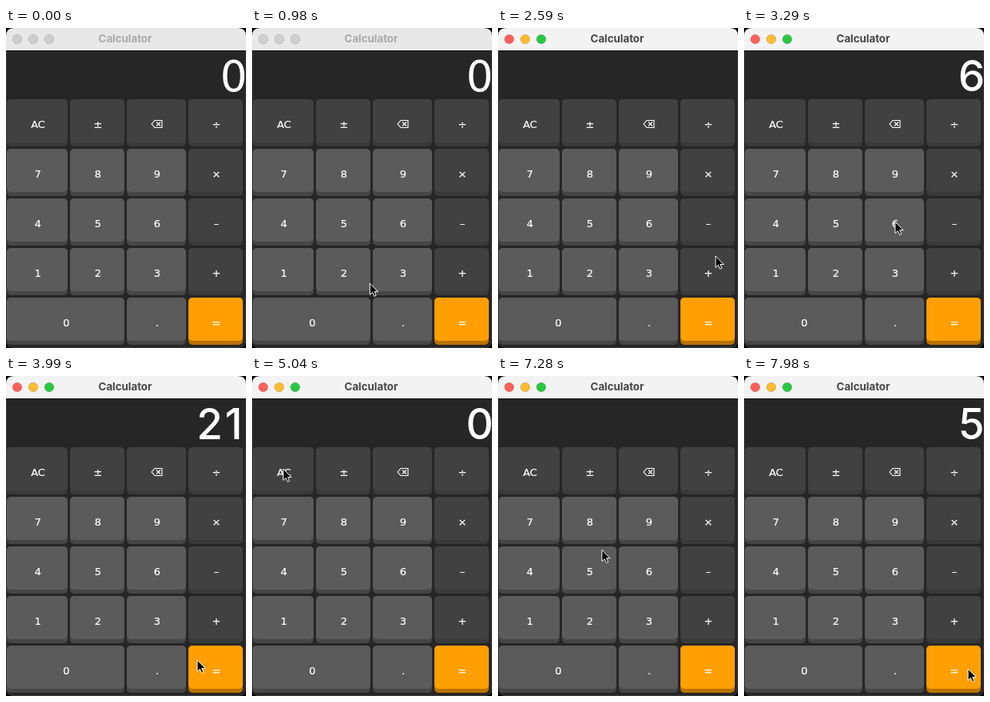
Animation, 300 px wide and 400 px high, one loop 8000 ms. Source, as an HTML page:

```html
<!DOCTYPE html>
<html lang="en">
<head>
<meta charset="utf-8">
<title>Calculator</title>
<style>
  html, body { margin: 0; width: 100%; height: 100%; overflow: hidden; background: #000; }
  svg { display: block; width: 100%; height: 100%; }
  text { text-anchor: middle; fill: #fff; }
  .title { font: 700 13.3px Inter, sans-serif; }
  .key { font: 13px "DejaVu Sans", sans-serif; stroke: #fff; stroke-width: .2; }
  .digit { font: 500 53px Inter, sans-serif; }
  .digit.initial { font: 53px "DejaVu Sans", sans-serif; }
</style>
</head>
<body>
<svg viewBox="0 0 300 400">
  <rect width="300" height="400" fill="#000"/>
  <rect y="10" width="300" height="390" rx="9" fill="#262627"/>
  <path id="titleBar" d="M0 28V10Q0 0 10 0H290Q300 0 300 10V28Z"/>
  <rect y="28" width="300" height="1" fill="#111"/>
  <path d="M.5 29V391Q.5 399.5 9 399.5H291Q299.5 399.5 299.5 391V29" fill="none" stroke="#3a3a3b"/>
  <g id="lights"></g>
  <text id="title" class="title" x="149" y="18.3">Calculator</text>
  <g id="display"></g>
  <g id="keys"></g>
  <path id="cursor" d="M0 0V14.4L3.3 11.4L5.5 16.3L7.8 15.3L5.7 10.5H10.2Z"
        fill="#000" stroke="#fff" stroke-linejoin="round"/>
</svg>
<script>
const LOOP = 8000, STEP = 70, ACTIVATE = 1190;
const byId = id => document.getElementById(id);

function add(parent, tag, attributes, text = '') {
  const node = document.createElementNS('http://www.w3.org/2000/svg', tag);
  for (const name in attributes) node.setAttribute(name, attributes[name]);
  node.textContent = text;
  parent.append(node);
  return node;
}

// Keys: a lit face over a darker lower edge
const palette = {
  dark: ['#414141', '#3a3a3a'],
  light: ['#5b5b5b', '#464646'],
  orange: ['#ff9f02', '#b87303']
};
const columns = [[1, 76], [80, 68], [151, 74], [228, 68]];
const rows = ['C±⌫÷', '789×', '456–', '123+', '0 .='];
const keyCenters = {};

function addKey(label, x, y, width, kind) {
  const keys = byId('keys'), [face, edge] = palette[kind];
  const center = x + width / 2 + 1;
  keyCenters[label] = [center - 1, y + 27];
  add(keys, 'rect', { x, y, width, height: 59, rx: 5, fill: edge });
  add(keys, 'rect', { x, y, width, height: 54, rx: 5, fill: face });
  if (label === '⌫') {
    add(keys, 'path', {
      d: `M${center - 7} ${y + 31}l4 -4.5h9v9h-9ZM${center - 1} ${y + 28.5}l5 5m0 -5l-5 5`,
      fill: 'none', stroke: '#fff', 'stroke-width': 1.1
    });
  } else {
    add(keys, 'text', { class: 'key', x: center, y: y + 36 }, label === 'C' ? 'AC' : label);
  }
}

rows.forEach((labels, row) => [...labels].forEach((label, column) => {
  if (label === ' ') return;
  const [x, width] = columns[column];
  const kind = label === '=' ? 'orange' : row === 0 || column === 3 ? 'dark' : 'light';
  addKey(label, x, 89 + row * 62, label === '0' ? 147 : width, kind);
}));

const lights = ['#ff5f57', '#febc2e', '#28c840'].map((color, i) => ({
  color,
  node: add(byId('lights'), 'circle', { cx: 14 + i * 20, cy: 14, r: 5.8, 'stroke-width': 0.8 })
}));

// Key presses; aim is where the pointer lands relative to the key's center
const presses = [
  { key: '1', at: 1330 },
  { key: '5', at: 1750 },
  { key: '+', at: 2520, aim: [10, -17] },
  { key: '6', at: 3150 },
  { key: '=', at: 3920, aim: [-23, -9] },
  { key: 'C', at: 5040 },
  { key: '2', at: 5530 },
  { key: '0', at: 5880, aim: [-18, 9] },
  { key: '÷', at: 6860, aim: [6, 19] },
  { key: '4', at: 7550, aim: [26, 16] },
  { key: '=', at: 7910, aim: [18, 2] }
];

const operations = { '+': (a, b) => a + b, '÷': (a, b) => a / b };

function readingAt(time) {
  let entry = '0', fresh = true, stored, operator;
  for (const { key, at } of presses) {
    if (at > time) break;
    if (key === 'C') {
      entry = '0';
      fresh = true;
    } else if (key === '=') {
      entry = String(operations[operator](stored, +entry));
      fresh = true;
    } else if (key in operations) {
      stored = +entry;
      operator = key;
      entry = '';
    } else {
      entry = fresh ? key : entry + key;
      fresh = false;
    }
  }
  return entry;
}

// The pointer reaches each key shortly before the press and lingers after it
const LEAD = 70, LINGER = 90;

function pointerAt(time) {
  let from = [312, 345], leave = 610;
  for (const { key, at, aim = [0, 0] } of presses) {
    const to = keyCenters[key].map((center, axis) => center + aim[axis]);
    if (time < at + LINGER) {
      const u = Math.min(1, Math.max(0, (time - leave) / (at - LEAD - leave)));
      const eased = u * u * (3 - 2 * u);
      return from.map((start, axis) => start + (to[axis] - start) * eased);
    }
    from = to;
    leave = at + LINGER;
  }
  return from;
}

function showReading(value, initial) {
  byId('display').replaceChildren();
  [...value].reverse().forEach((digit, place) => add(byId('display'), 'text', {
    class: initial ? 'digit initial' : 'digit', x: 284.5 - place * 30, y: 79
  }, digit));
}

function draw(time) {
  const active = time >= ACTIVATE;
  byId('titleBar').setAttribute('fill', active ? '#f4f3f4' : '#e9e8e9');
  byId('title').style.fill = active ? '#474647' : '#aaa9aa';
  for (const { color, node } of lights) {
    node.setAttribute('fill', active ? color : '#cfcecf');
    node.setAttribute('stroke', active ? 'rgba(0,0,0,.2)' : '#b8b7b8');
  }
  showReading(readingAt(time), time < presses[0].at);
  byId('cursor').setAttribute('transform', `translate(${pointerAt(time)})`);
}

function tick() {
  draw(Math.floor(performance.now() % LOOP / STEP) * STEP);
  requestAnimationFrame(tick);
}
tick();
</script>
</body>
</html>
```
